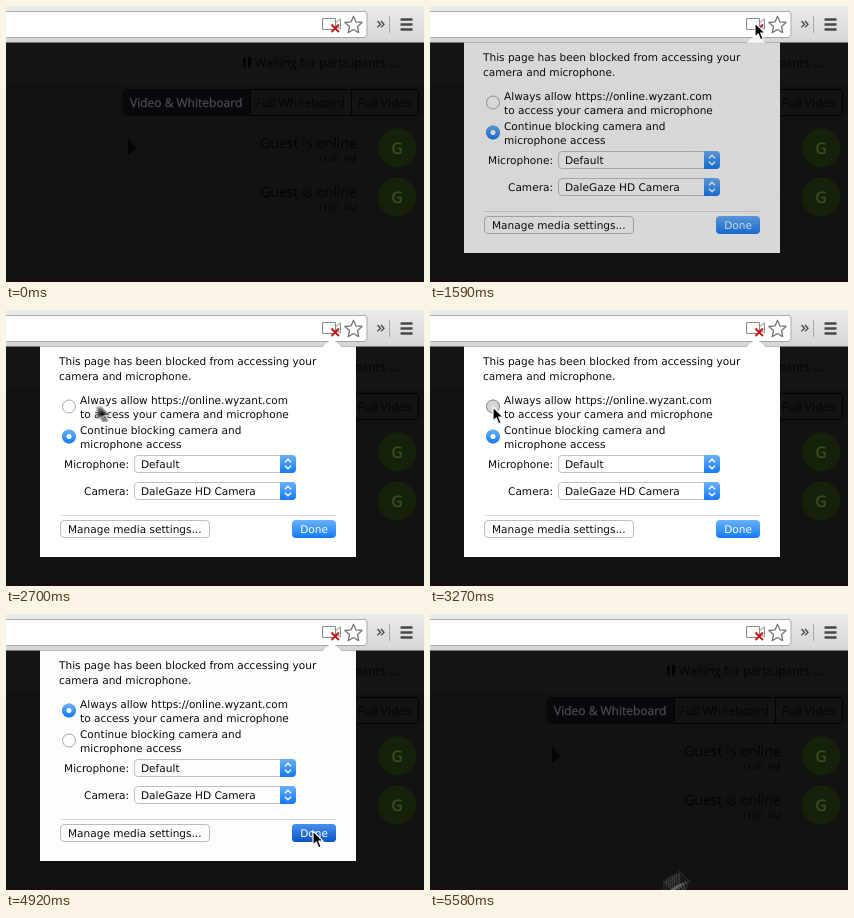
Write an HTML page with a canvas that moves like this. It is 418 by 276 pixels and loops after 5.61 s.

```html
<!DOCTYPE html>
<html lang="en">
<head>
<meta charset="utf-8">
<title>Allow camera access</title>
<style>
  html, body { margin: 0; width: 100%; height: 100%; overflow: hidden; background: #121212; }
  svg, canvas { position: absolute; left: 0; top: 0; width: 418px; height: 276px; }
  text { text-rendering: geometricPrecision; }
  .page { font: 12px "Open Sans", sans-serif; fill: #030303; }
  .dialog { font: 10.55px "DejaVu Sans", sans-serif; fill: #0a0a0a; }
  .end { text-anchor: end; }
  .mid { text-anchor: middle; }
  .dialog, .first, .second, .held, .pressed { animation: 5610ms linear infinite both; }
  .dialog { animation-name: dialog; }
  .first { animation-name: pick; }
  .second { animation-name: unpick; }
  .held { animation-name: held; }
  .pressed { animation-name: pressed; }
  @keyframes dialog {
    0%, 25.668% { opacity: 0; }
    28.877%, 87.701% { opacity: 1; }
    90.909%, 100% { opacity: 0; }
  }
  @keyframes pick { 0%, 59.893% { opacity: 0; } 62.032%, 100% { opacity: 1; } }
  @keyframes unpick { 0%, 59.893% { opacity: 1; } 62.032%, 100% { opacity: 0; } }
  @keyframes held {
    0%, 56.68% { opacity: 0; }
    56.684%, 59.893% { opacity: 1; }
    62.032%, 100% { opacity: 0; }
  }
  @keyframes pressed { 0%, 86.09% { opacity: 0; } 86.096%, 100% { opacity: 1; } }
</style>
</head>
<body>
<svg viewBox="0 0 418 276">
  <defs>
    <linearGradient id="bar" x2="0" y2="1"><stop stop-color="#ececec"/><stop offset="1" stop-color="#d6d6d6"/></linearGradient>
    <linearGradient id="blue" x2="0" y2="1"><stop stop-color="#69b2fa"/><stop offset="1" stop-color="#157bf6"/></linearGradient>
    <linearGradient id="deep" x2="0" y2="1"><stop stop-color="#4b93ee"/><stop offset="1" stop-color="#0b55cb"/></linearGradient>
    <g id="dot">
      <circle r="7" fill="url(#blue)"/>
      <circle r="2.5" fill="#fff"/>
    </g>
    <g id="select">
      <rect x=".5" y=".5" width="161" height="17" rx="3.5" fill="#fff" stroke="#c2c2c2"/>
      <path d="M146 0h12a4 4 0 0 1 4 4v10a4 4 0 0 1-4 4h-12z" fill="url(#blue)"/>
      <path d="M151 7.2l3-3 3 3M151 10.8l3 3 3-3" fill="none" stroke="#fff" stroke-width="1.4"/>
    </g>
    <g id="guest">
      <text x="351" y="142" class="end" font-size="14.1">Guest is online</text>
      <text x="351" y="156" class="end" font-size="9" fill="#050505">11:41 AM</text>
      <circle cx="391" cy="142" r="19.5" fill="#16210a"/>
      <text x="391" y="148" class="mid" font-size="16" font-weight="600" fill="#3b4a1f">G</text>
    </g>
  </defs>

  <g class="page">
    <rect y="36" width="418" height="240" fill="#121212"/>
    <rect y="36" width="418" height="43" fill="#141414"/>
    <rect y="79" width="117" height="197" fill="#111"/>
    <rect y="271" width="418" height="5" fill="#150f0f"/>
    <path d="M237 51.5h3v10h-3zM242 51.5h3v10h-3z"/>
    <text x="249" y="61">Waiting for participants ...</text>
    <rect x="117.5" y="83.5" width="295" height="26" rx="3" fill="#131313" stroke="#020202"/>
    <path d="M120 83.5h124v26H120a2.5 2.5 0 0 1-2.5-2.5V86a2.5 2.5 0 0 1 2.5-2.5z" fill="#09080d"/>
    <path d="M244.5 84v25M345.5 84v25" stroke="#020202"/>
    <text x="124" y="101" fill="#4c4c4e" stroke="#4c4c4e" stroke-width=".25">Video &amp; Whiteboard</text>
    <text x="250" y="101">Full Whiteboard</text>
    <text x="352" y="101">Full Video</text>
    <path d="M122 133.5l9 8-9 8z" fill="#04040c"/>
    <use href="#guest"/>
    <use href="#guest" y="49"/>
  </g>

  <rect width="418" height="36" fill="url(#bar)"/>
  <rect y="36" width="418" height="1" fill="#777"/>
  <rect x="-6" y="5.5" width="367" height="26" rx="3" fill="#fff" stroke="#a9a9a9"/>
  <path d="M316.5 12.5h13v11h-13zM329.5 16.5l5-3.5v10l-5-3.5" fill="#fafafa" stroke="#8c8c8c"/>
  <path d="M325.5 18.5l7.5 7.5M333 18.5l-7.5 7.5" stroke="#c4161c" stroke-width="2"/>
  <path id="star" fill="#fff" stroke="#777" stroke-width="1.3" stroke-linejoin="round"/>
  <path d="M371.5 15l3 3.2-3 3.2M375 15l3 3.2-3 3.2" fill="none" stroke="#444" stroke-width="1.3"/>
  <path d="M383.5 10v17" stroke="#a8a8a8"/>
  <path d="M394.5 13.5h12M394.5 18.5h12M394.5 23.5h12" stroke="#484848" stroke-width="2.6"/>

  <g class="dialog">
    <path d="M34 36.5h283l9-8 9 8h15V247H34z" fill="#fff"/>
    <text x="53" y="55">This page has been blocked from accessing your</text>
    <text x="53" y="70">camera and microphone.</text>
    <g fill="#fff" stroke="#a8a8a8">
      <circle cx="63" cy="96.5" r="6.5"/>
      <circle cx="63" cy="126.5" r="6.5"/>
      <circle cx="63" cy="96.5" r="6.5" class="held" fill="#d4d4d4" stroke="#8f8f8f"/>
    </g>
    <g class="first"><use href="#dot" x="63" y="96.5"/></g>
    <g class="second"><use href="#dot" x="63" y="126.5"/></g>
    <text x="74" y="94">Always allow https://online.wyzant.com</text>
    <text x="74" y="108">to access your camera and microphone</text>
    <text x="74" y="124">Continue blocking camera and</text>
    <text x="74" y="138">microphone access</text>
    <text x="123" y="158" class="end">Microphone:</text>
    <text x="123" y="185" class="end">Camera:</text>
    <use href="#select" x="128" y="145"/>
    <use href="#select" x="128" y="172"/>
    <text x="135" y="158">Default</text>
    <text x="135" y="185">DaleGaze HD Camera</text>
    <path d="M54 205.5h276" stroke="#dcdcdc"/>
    <rect x="54.5" y="210.5" width="149" height="17" rx="3.5" fill="#fff" stroke="#bdbdbd"/>
    <text x="62" y="223">Manage media settings...</text>
    <rect x="286" y="210" width="44" height="18" rx="4" fill="url(#blue)"/>
    <rect x="286" y="210" width="44" height="18" rx="4" fill="url(#deep)" class="pressed"/>
    <text x="308" y="223" class="mid" fill="#fff">Done</text>
  </g>
</svg>
<canvas width="418" height="276"></canvas>

<script>
const LOOP = 5610, STEP = 30, SAMPLES = 8;

// Pointer path: time, x, y
const path = [
  [240, 215, 290], [540, 240, 170], [820, 285, 40], [1110, 324, 22], [1380, 325, 17],
  [1840, 325, 17], [2220, 240, 74], [2400, 165, 90], [2910, 67, 97], [3000, 67, 97],
  [3120, 63, 97], [3730, 63, 97], [4020, 175, 155], [4290, 300, 212], [4560, 307, 217],
  [5460, 307, 217], [5520, 285, 235], [5550, 252, 256], [5580, 234, 267], [5610, 215, 282]
];

const slope = (i, k) => (path[i + 1][k] - path[i][k]) / (path[i + 1][0] - path[i][0]);

function tangent(i, k) {
  if (i === 0 || i === path.length - 1) return slope(Math.max(i - 1, 0), k);
  const a = slope(i - 1, k), b = slope(i, k);
  return a * b <= 0 ? 0 : 2 * a * b / (a + b);
}

// Monotone cubic through the path points
function pointAt(t) {
  const i = path.findIndex((p, n) => n < path.length - 1 && t >= p[0] && t <= path[n + 1][0]);
  if (i < 0) return null;
  const span = path[i + 1][0] - path[i][0], u = (t - path[i][0]) / span, v = 1 - u;
  return [1, 2].map(k =>
    v * v * (1 + 2 * u) * path[i][k] + u * u * (3 - 2 * u) * path[i + 1][k] +
    span * u * v * (v * tangent(i, k) - u * tangent(i + 1, k)));
}

const ctx = document.querySelector('canvas').getContext('2d');
const arrow = new Path2D('M0 0V14L3.2 11 5.6 16.8 8.2 15.7 5.8 10.2H10.2Z');

function drawPointer(t) {
  ctx.setTransform(1, 0, 0, 1, 0, 0);
  ctx.clearRect(0, 0, 418, 276);
  const spots = Array.from({ length: SAMPLES }, (_, k) => pointAt(t - k * STEP / SAMPLES)).filter(Boolean);
  const still = spots.every(p => Math.hypot(p[0] - spots[0][0], p[1] - spots[0][1]) < 0.05);
  const shown = still ? spots.slice(0, 1) : spots;

  // Summing faint copies averages them into motion blur
  ctx.globalCompositeOperation = still ? 'source-over' : 'lighter';
  ctx.globalAlpha = still ? 1 : 1 / SAMPLES;
  for (const [x, y] of shown) {
    ctx.setTransform(1, 0, 0, 1, x, y);
    ctx.strokeStyle = '#fff';
    ctx.lineWidth = 1.2;
    ctx.fillStyle = '#000';
    ctx.fill(arrow);
    ctx.stroke(arrow);
  }
}

const star = Array.from({ length: 10 }, (_, i) => {
  const r = i % 2 ? 4.2 : 9, a = (i / 5 - 0.5) * Math.PI;
  return `${(347.5 + r * Math.cos(a)).toFixed(1)} ${(19.3 + r * Math.sin(a)).toFixed(1)}`;
});
document.getElementById('star').setAttribute('d', `M${star.join('L')}Z`);

let start;
function frame(now) {
  start ??= now;
  const t = (now - start) % LOOP;
  drawPointer(Math.floor(t / STEP) * STEP);
  requestAnimationFrame(frame);
}
requestAnimationFrame(frame);
</script>
</body>
</html>
```
